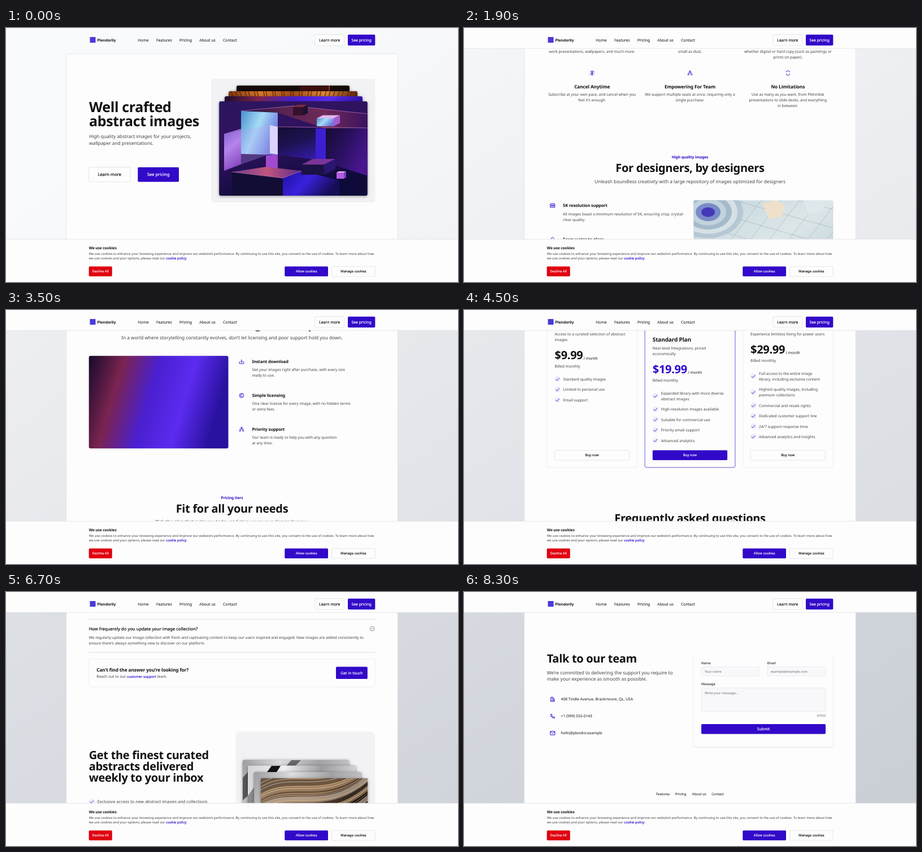
These frames come from a looping animation (800x450 px, 8400 ms). An HTML page:

```html
<!DOCTYPE html>
<html lang="en">
<head>
<meta charset="utf-8">
<title>Landing page scroll</title>
<style>
html, body { margin: 0; width: 100%; height: 100%; overflow: hidden; background: #f9fafb; }
svg { display: block; width: 100vw; height: 100vh; }
text { font-family: "Noto Sans", sans-serif; white-space: pre; text-rendering: geometricPrecision; }
text[font-weight="600"] { letter-spacing: -.0155em; }
text[font-weight="500"] { letter-spacing: .012em; }
.inter { font-family: Inter, sans-serif; }
.serif { font-family: "Noto Serif", serif; }
.lift { filter: drop-shadow(0 .5px .6px rgba(0, 0, 0, .14)); }
.panel { filter: drop-shadow(0 1px .8px rgba(0, 0, 0, .12)); }
.photo { filter: drop-shadow(0 1px 2.5px rgba(0, 0, 0, .45)); }
</style>
</head>
<body>
<svg id="stage" viewBox="0 0 800 450"></svg>
<script>
const INK = '#111', BODY = '#404040', BRAND = '#3209c9', PAPER = '#fdfdfd', LINE = '#e3e4e8';
const XS = 5.83, SM = 6.67, MD = 7.5, LG = 8.33, H2 = 20;

// A hairline outline gives the medium weight between regular and bold
const medium = (size, color) => `stroke="${color}" stroke-width="${(size * .028).toFixed(3)}"`;
const text = (x, y, s, size = SM, weight = 400, fill = BODY, anchor = 'start', cls = '') =>
  `<text class="${cls}" x="${x}" y="${(y + size * .36).toFixed(2)}" font-size="${size}" font-weight="${weight}" fill="${fill}" text-anchor="${anchor}" ${weight === 500 ? medium(size, fill) : ''}>${s}</text>`;
const link = (s, size) => `<tspan font-size="${size}" fill="${BRAND}" letter-spacing=".07" ${medium(size, BRAND)}>${s}</tspan>`;
const mid = (x, y, s, size, weight, fill) => text(x, y, s, size, weight, fill, 'middle');
const lines = (x, y, step, list, ...style) => list.map((s, i) => text(x, y + i * step, s, ...style)).join('');
const rect = (x, y, x2, y2, fill, r = 0, extra = '') =>
  `<rect x="${x}" y="${y}" width="${x2 - x}" height="${y2 - y}" rx="${r}" fill="${fill}" ${extra}/>`;
const border = (color, w = .6) => `stroke="${color}" stroke-width="${w}"`;
const poly = (points, fill, extra = '') => `<polygon points="${points}" fill="${fill}" ${extra}/>`;
const stroke = (d, color, w, extra = '') => `<path d="${d}" fill="none" stroke="${color}" stroke-width="${w}" ${extra}/>`;
const group = (y, body) => `<g transform="translate(0 ${y})">${body}</g>`;
const clipTo = (id, box, body) => `<clipPath id="${id}">${box}</clipPath><g clip-path="url(#${id})">${body}</g>`;
const ring = r => `M${-r} 0a${r} ${r} 0 1 0 ${2 * r} 0a${r} ${r} 0 1 0 ${-2 * r} 0`;
const grad = (id, dir, ...colors) => {
  const [x1, y1, x2, y2] = dir;
  return `<linearGradient id="${id}" x1="${x1}" y1="${y1}" x2="${x2}" y2="${y2}">` +
    colors.map((c, i) => `<stop offset="${i / (colors.length - 1)}" stop-color="${c}"/>`).join('') + '</linearGradient>';
};

function button(x, y, x2, y2, label, size, kind = 'main') {
  const fill = { main: BRAND, plain: PAPER, red: '#e00010' }[kind];
  const edge = kind === 'plain' ? border('#dcdce0', .5) : '';
  return rect(x, y, x2, y2, fill, 1.7, edge + ' class="lift"') +
    mid((x + x2) / 2, (y + y2) / 2, label, size, 500, kind === 'plain' ? INK : '#fff');
}
const icon = (x, y, d) => `<g transform="translate(${x} ${y})"><circle r="10" fill="#fff" class="lift"/>${stroke(d, BRAND, 1)}</g>`;
const check = (x, y) => `<g transform="translate(${x} ${y})"><circle r="5" fill="#ecebfb"/>${stroke('M-3.2 .2L-1 2.4L3.4-2.2', BRAND, .9)}</g>`;
const heading = (y, title, sub) => mid(400, y, title, H2, 600, INK) + (sub ? mid(400, y + 24, sub, LG) : '');

const ICONS = {
  save: 'M-3.8 0V3.6H3.8V0M0-3.8V1.2M-2.2-1L0 1.2L2.2-1',
  craft: 'M-2.6-1.2L.6-3L3.4-2.6L3 .6L.8 2.8L-1.6 2.6L-3 .8ZM-3.8 3.6L-1.6 2.6M2.4-2.4L4-3.8',
  copy: ring(3.8) + 'M1.5-1A1.8 1.8 0 1 0 1.5 1',
  cancel: 'M-3.4-1.6A3.8 3.8 0 0 1 3.7-.8M3.4 1.6A3.8 3.8 0 0 1-3.7 .8M1.3-1.3H-1V0H1V1.4H-1.4M0-2.2V2.3',
  team: 'M-1.3-2.6a1.3 1.3 0 1 0 2.6 0a1.3 1.3 0 1 0-2.6 0M-1.8 4V1A1.8 1.8 0 0 1 1.8 1V4M-3-1.4V-.4M3-1.4V-.4M-3.8 4V2L-2.6 .6M3.8 4V2L2.6 .6',
  loop: 'M-3.6-1.4A3.8 3.8 0 0 1 2.7-2.7V-1M3.6 1.4A3.8 3.8 0 0 1-2.7 2.7V1',
  hd: 'M-4-3.2H4V3.2H-4ZM-2.2-1.4V1.4M-2.2 0H-.6M-.6-1.4V1.4M1-1.2H2.2V1.2H1Z',
  drop: 'M0-4.2L2.7-1.4A3.7 3.7 0 1 1-2.7-1.4ZM-2.4-.8L2.4 3M2.2-.6L-2.2 3',
  arc: 'M-4 2.6V.8A4 4 0 0 1 4 .8V2.6M-2.5 2.6V.8A2.5 2.5 0 0 1 2.5 .8V2.6M-1 2.6V.8A1 1 0 0 1 1 .8V2.6',
  office: 'M-4.2 3.6H4.2M-3.2 3.6V-3.6H1V3.6M1-.6H3.2V3.6M-1.8-1.8H-.4M-1.8 0H-.4M-1.8 1.8H-.4',
  phone: 'M-3.6-3.4H-1.4L-.6-1.2L-1.8-.4A5 5 0 0 0 .6 1.8L1.4 .6L3.6 1.4V3.6A7 7 0 0 1-3.6-3.4Z',
  mail: 'M-4-3.2H4V3.2H-4ZM-4-2.6L0 .6L4-2.6',
};

const item = (x, y, name, title, a, b) =>
  icon(x + 10, y, ICONS[name]) + text(x + 28.4, y, title, MD, 600, INK) + lines(x + 28.4, y + 14.5, 10, [a, b]);

// Front, top and right faces of a block
const block = (x, y, w, h, d, front, top, side) =>
  poly(`${x},${y} ${x + w},${y} ${x + w},${y + h} ${x},${y + h}`, front) +
  poly(`${x},${y} ${x + d},${y - d / 2} ${x + w + d},${y - d / 2} ${x + w},${y}`, top) +
  poly(`${x + w},${y} ${x + w + d},${y - d / 2} ${x + w + d},${y + h - d / 2} ${x + w},${y + h}`, side);

function cubes() {
  const shapes = [
    ['416,147 508,138 640,152 640,180 565,178 481,150', 'url(#dusk)'],
    ['386,188 416,179 416,241 386,253', 'url(#plum)'],
    ['416,147 481,150 481,225 416,223', 'url(#ice)'],
    ['386,188 470,171 470,222 386,253', '#b6a0f4', 'opacity=".28"'],
    ['481,175 565,178 565,236 481,224', 'url(#deep)'],
    ['566,178 640,177 640,262 566,238', 'url(#wing)'],
    ['548,178 566,178 566,237 548,233', '#3c1fd0'],
    ['467,172 481,175 481,224 467,222', '#dcd4fb'],
    ['460,226 481,224 481,250 460,247', '#a04ad0'],
    ['400,255 460,246 523,253 490,266', 'url(#rose)'],
    ['400,255 490,266 490,297 400,297', '#120d34'],
    ['490,266 523,253 590,270 590,297 490,297', 'url(#glow)'],
  ];
  return clipTo('heroClip', rect(377.5, 130, 639.5, 297, '#000', 3),
    rect(377, 130, 640, 298, 'url(#night)') + shapes.map(s => poly(...s)).join('') +
    stroke('M386 188L416 179M416 147L508 138L640 152M481 175L640 177M400 255L490 266L523 253', '#d98ac8', .6) +
    block(508, 140, 18, 15, 8, '#33122e', '#7a2c3c', '#1d1030') +
    block(550, 160, 30, 14, 11, 'url(#ice)', '#e0b8ee', '#a85ad0') +
    block(523, 242, 40, 18, 20, '#1c1144', '#7a3596', '#2a1670') +
    block(585, 256, 13, 11, 4, '#b65ce0', '#efc4f0', '#7a3cc8'));
}

function glass() {
  let s = rect(406, 92, 654, 256, 'url(#mist)');
  for (let i = 0; i < 12; i++) {
    s += stroke(`M${390 + i * 34} 92l-130 170M400 ${40 + i * 30}l260 ${70 + i * 3}`, '#8ba0ad', .5);
  }
  for (let i = 0; i < 6; i++) {
    s += `<ellipse cx="432" cy="113" rx="${62 - i * 10}" ry="${46 - i * 7.5}" fill="${['#b3c5d2', '#dce6ea', '#9db4c7', '#c8d8e0', '#6d7fc6', '#3c2ab6'][i]}" opacity=".85"/>`;
  }
  const tube = (x, y, w, fill) => stroke(`M${x} ${y}L${x - 100} ${y + 96}`, fill, w, 'stroke-linecap="round"');
  s += tube(506, 186, 24, '#eef0fb') + tube(506, 186, 15, '#6a52d4') + tube(503, 187, 6, '#e9e8ff') +
    tube(529, 198, 18, '#dfe3f4') + tube(529, 198, 9, '#4b2fcb') + tube(533, 201, 3, '#fff');
  s += poly('520,170 543,164 541,206 518,204', '#e4c7ce', 'opacity=".75"') + poly('540,172 560,180 545,200', '#d895b1', 'opacity=".7"');
  s += poly('566,174 588,160 614,170 612,204 588,217 568,200', '#b9dbe9') +
    poly('566,174 590,184 588,217 568,200', '#8fbace') + stroke('M566 174L590 184L614 170M590 184L588 217', '#f3fafc', 1);
  s += poly('528,98 552,92 568,100 562,122 540,124', '#efe0cb') + poly('600,92 640,92 636,112 610,116', '#dde9ec');
  for (let i = 0; i < 4; i++) {
    s += `<ellipse cx="590" cy="262" rx="${70 - i * 12}" ry="${37 - i * 7}" fill="${['#93aab8', '#d5e2e6', '#8494c4', '#b9cbd8'][i]}" opacity=".9"/>`;
  }
  return clipTo('glassClip', rect(406.5, 92, 653.5, 256, '#000', 3), s);
}

function strands() {
  const wave = y => `M445 ${y}C505 ${y - 44} 565 ${y + 16} 650 ${y - 64}`;
  let s = rect(451, 119, 640, 240, 'url(#umber)');
  for (let i = 0; i < 7; i++) s += stroke(wave(156 + i * 18), i % 2 ? '#f3e2cb' : '#c9a47a', 9 - i * .6, 'opacity=".5"');
  for (let i = 0; i < 34; i++) s += stroke(wave(132 + i * 4.2 + 3 * Math.sin(i * 2)), i % 3 ? '#e3bd8a' : '#fff8ee', .7, 'opacity=".75"');
  return clipTo('strandClip', rect(451, 119, 640, 240, '#000', 3), s);
}

function stripes() {
  let d = '';
  for (let i = 0; i < 28; i++) d += `M${398 + i * 8 + 2 * Math.sin(i * 3)} 112l${4 - i * .3} 10`;
  return stroke(d, '#5a1f0c', 1.6, 'opacity=".75"');
}

const hero = () =>
  lines(147, 139.5, 25, ['Well crafted', 'abstract images'], 25, 600, INK) +
  lines(147, 192.3, 11.7, ['High quality abstract images for your projects,', 'wallpaper and presentations.'], LG) +
  button(146.7, 246.7, 220, 272.4, 'Learn more', MD, 'plain') + button(233.3, 246.7, 306, 272.4, 'See pricing', MD) +
  rect(363.3, 90, 653.5, 309, '#f2f2f4', 4) +
  rect(408, 102, 608, 150, '#16090a', 3, 'class="photo"') + rect(520, 103, 570, 112, '#3d0f0c') + rect(571, 102, 573, 112, '#a33a20') +
  rect(394, 112, 622, 160, 'url(#ember)', 3, 'class="photo"') + stripes() +
  rect(387, 121, 631, 170, 'url(#violet)', 3, 'class="photo"') +
  rect(377.5, 130, 639.5, 297, '#120a35', 3, 'class="photo"') + cubes();

const features = () => {
  const rows = [
    [239, 'save', 'Infinite Download', 'Once you subscribe to our plans, they’re all yours.', 'Download as many as you want and use them for', 'work presentations, wallpapers, and much more.'],
    [239, 'craft', 'Purely Handcrafted', 'No AI, no generic images. Crafted from various', 'chemicals, fabrics, clouds, or even particles as', 'small as dust.'],
    [239, 'copy', 'All Are Under Licensed', 'The only limitation with these abstract images is', 'that you are not able to sell them in any form,', 'whether digital or hard copy (such as paintings or', 'prints on paper).'],
    [335.5, 'cancel', 'Cancel Anytime', 'Subscribe at your own pace, and cancel when you', 'feel it’s enough.'],
    [335.5, 'team', 'Empowering For Team', 'We support multiple seats at once, requiring only a', 'single purchase.'],
    [335.5, 'loop', 'No Limitations', 'Use as many as you want, from Plimmble', 'presentations to slide decks, and everything', 'in between.'],
  ];
  return mid(400, 152, 'Premium abstract images', SM, 600, BRAND) +
    heading(172, 'Easy access to top quality images', 'In a world where storytelling constantly evolves, we lead with groundbreaking images designed for your presentation excellence.') +
    rows.map(([y, name, title, ...copy], i) => {
      const x = 226.7 + (i % 3) * 173.3;
      return icon(x, y, ICONS[name]) + mid(x, y + 24, title, LG, 600, INK) + lines(x, y + 38.3, 10, copy, SM, 400, BODY, 'middle');
    }).join('');
};

const logos = [
  ['Ferrinmoor', 9.2, 600, 'inter', 'circle'], ['QUIVLO', 10.5, 900, 'inter', 'square'], ['VORSTEL', 10, 600, 'serif', 'circle'],
  ['Zim Lop', 9.5, 700, 'inter', 'square'], ['PLOND BRUF', 11, 800, 'inter', ''], ['Wexolin', 10.5, 900, 'inter', 'square'],
];
const logoRow = () => {
  let s = '';
  for (let i = -1; i < 8; i++) {
    const [name, size, weight, cls, mark] = logos[(i + 6) % 6], x = 140 + i * 104.2;
    if (mark === 'circle') s += `<circle cx="${x + 8}" cy="47" r="7.7" fill="#262626"/>`;
    if (mark === 'square') s += rect(x + 1, 40, x + 15, 54, '#262626', 1);
    s += text(x + (mark ? 20 : -1), 47.3, name, size, weight, '#262626', 'start', cls);
  }
  return clipTo('logoClip', rect(107, 30, 693, 64, '#000'), `<g id="logos">${s}</g>`);
};

const designers = () =>
  mid(400, 15, 'High quality images', SM, 600, BRAND) +
  heading(35, 'For designers, by designers', 'Unleash boundless creativity with a large repository of images optimized for designers') +
  item(146.7, 101.5, 'hd', '5K resolution support', 'All images boast a minimum resolution of 5K, ensuring crisp, crystal-', 'clear quality.') +
  item(146.7, 161.5, 'drop', 'From water to glass', 'We offer a wide array of abstractions, ranging from water to glass,', 'and encompassing various styles including 3D and vector.') +
  item(146.7, 221.5, 'arc', 'Portrait or landscape', 'Effortlessly adapt your images for any platform - whether it’s a', 'stunning wallpaper or captivating Vorlipeek reels and stories.') +
  glass() +
  heading(351, 'Convenience and licensing that empowers', 'In a world where storytelling constantly evolves, don’t let licensing and poor support hold you down.') +
  rect(146.7, 407, 393.5, 571, 'url(#violet)', 3) +
  item(407, 417, 'save', 'Instant download', 'Get your images right after purchase, with every size', 'ready to use.') +
  item(407, 477, 'copy', 'Simple licensing', 'One clear license for every image, with no hidden terms', 'or extra fees.') +
  item(407, 537, 'team', 'Priority support', 'Our team is ready to help you with any question', 'at any time.');

function plan(x, y, title, copy, price, items, main) {
  const x0 = x + 13.7, dy = copy.length * 10;
  let s = rect(x, 7, x + 159.8, 279, PAPER, 3, main ? border('#5a48d2', .9) : border(LINE)) +
    text(x0, y, title, 10, 600, INK) + lines(x0, y + 15.8, 10, copy) +
    text(x0, y + 33 + dy, price, H2, 600, main ? BRAND : INK) +
    text(x0 + (price.length < 6 ? 51 : 62.5), y + 38.3 + dy, '/ month', SM, 400, INK) +
    text(x0, y + 52.5 + dy, 'Billed monthly');
  let row = y + 75.5 + dy;
  for (const entry of items) {
    const parts = entry.split('|');
    s += check(x0 + 5, row + (parts.length - 1) * 5) + lines(x0 + 15, row, 10, parts);
    row += 8.4 + parts.length * 10;
  }
  return s + button(x0, 248.5, x + 146, 266, 'Buy now', XS, main ? 'main' : 'plain');
}
const pricing = () =>
  mid(400, -105, 'Pricing tiers', SM, 600, BRAND) +
  heading(-86, 'Fit for all your needs', 'Pick the plan that suits you today and step up as your demands grow.') +
  mid(370, -22, 'Monthly', SM, 500, BRAND) + mid(430, -22, 'Annually', SM, 500, BODY) +
  plan(146.8, 27, 'Basic Plan', ['Access to a curated selection of abstract', 'images'], '$9.99',
    ['Standard quality images', 'Limited to personal use', 'Email support']) +
  plan(320.1, 52, 'Standard Plan', ['Next-level Integrations, priced', 'economically'], '$19.99',
    ['Expanded library with more diverse|abstract images', 'High-resolution images available', 'Suitable for commercial use', 'Priority email support', 'Advanced analytics'], true) +
  text(333.8, 28, 'Most Popular', XS, 500, BRAND) +
  plan(493.4, 27, 'Premium Plan', ['Experience limitless living for power users'], '$29.99',
    ['Full access to the entire image|library, including exclusive content', 'Highest quality images, including|premium collections', 'Commercial and resale rights', 'Dedicated customer support line', '24/7 support response time', 'Advanced analytics and insights']);

const faq = () => {
  const list = [
    ['What types of images are available on your platform?', 'Our platform offers a diverse range of abstract images across many styles and themes. Explore everything from vivid', 'renders to calm textures.'],
    ['How can I access and download images from your platform?', 'Accessing and downloading images from our platform is simple. Upon signing up and logging in, users can browse through our curated collection and', 'download their chosen images directly to their devices with just a few clicks.'],
    ['Do you offer free images, or is there a subscription required?', 'We provide both free and premium images on our platform. Users can explore a selection of free images without any subscription. For access to our entire', 'library and additional features, we offer subscription plans tailored to different user needs.'],
    ['What payment methods do you accept for subscriptions?', 'We accept a variety of payment methods, including credit/debit cards and online payment gateways, to make the subscription process convenient for our', 'users.'],
    ['Can I cancel or modify my subscription at any time?', 'Yes, absolutely. You have the flexibility to cancel or modify your subscription at any time through your account settings. Changes will take effect', 'immediately, ensuring you have full control over your subscription preferences.'],
    ['How frequently do you update your image collection?', 'We regularly update our image collection with fresh and captivating content to keep our users inspired and engaged. New images are added consistently to', 'ensure there’s always something new to discover on our platform.'],
  ];
  return heading(-81, 'Frequently asked questions', 'Get all the answers you need about our platform and plans.') +
    list.map(([q, a, b], i) => {
      const y = -18 + i * 58.7;
      return text(146.7, y, q, MD, 500, INK) + lines(146.7, y + 14.6, 10, [a, b]) +
        stroke(`M146.7 ${y + 41.3}H653.3`, '#d6d7da', .8) +
        `<g transform="translate(648.3 ${y - .4})">${stroke(ring(3.9) + 'M-2 0H2', '#777', .8)}</g>`;
    }).join('') +
    rect(146.8, 329, 653.2, 378, PAPER, 3, border(LINE)) +
    text(160.3, 348.3, 'Can’t find the answer you’re looking for?', LG, 600, INK) +
    text(160.3, 359.2, `Reach out to our ${link('customer support', 6)} team.`) +
    button(584, 342.5, 639.8, 364, 'Get in touch', SM);
};

const newsletter = () =>
  lines(146.7, 78, 20, ['Get the finest curated', 'abstracts delivered', 'weekly to your inbox'], H2, 600, INK) +
  ['Exclusive access to new abstract images and collections', 'Unlock special promotions only for subscribers', 'Regular doses of artistic inspiration']
    .map((s, i) => check(151.8, 160.5 + i * 20) + text(161.7, 160.5 + i * 20, s, MD)).join('') +
  rect(146.9, 227, 284, 243.3, '#f8f8fb', 1.7, border(LINE)) + text(153, 235, 'Enter your email', XS, 400, '#6b6b70') +
  button(291, 227, 329.5, 243.3, 'Subscribe', XS) +
  text(146.7, 255, 'We only send you the best! No spam.') +
  rect(406.6, 36.5, 653.4, 292, '#f2f2f5', 8) +
  rect(419, 86.5, 607, 209, 'url(#silver)', 3, 'class="photo"') +
  poly('419,118 428,108 428,150 419,158', '#55565a') + poly('419,180 428,165 428,200 419,204', '#4a4a4e') +
  poly('505,87 522,87 512,97 496,97', '#66676b') +
  rect(428, 96.5, 619, 218, 'url(#steel)', 3, 'class="photo"') +
  poly('470,97 486,97 479,108 462,108', '#141414') + poly('428,150 439,135 439,190 428,200', '#8a8b8f') +
  rect(439, 108, 629, 229, 'url(#silver)', 3, 'class="photo"') +
  rect(451, 119, 640, 240, '#2a211e', 3, 'class="photo"') + strands();

const field = (x, y, x2, y2, label, hint) =>
  text(x, y - 7, label, XS, 500, BODY) + rect(x, y, x2, y2, '#f8f8fb', 1.7, border(LINE)) + text(x + 6, y + 8.8, hint, XS, 400, '#6b6b70');
const contact = () =>
  text(146.7, 118, 'Talk to our team', H2, 600, INK) +
  lines(146.7, 142.5, 11.8, ['We’re committed to delivering the support you require to', 'make your experience as smooth as possible.'], LG) +
  [['office', '408 Tindle Avenue, Brackmoore, QL, USA'], ['phone', '+1 (999) 555-0143'], ['mail', 'hello@plendor.example']]
    .map(([name, s], i) => icon(156.8, 190 + i * 30, ICONS[name]) + text(171.6, 190 + i * 30, s, SM, 400, INK)).join('') +
  rect(406.6, 108, 653.4, 274, PAPER, 3, 'class="panel"') +
  field(420, 132.5, 523.3, 149, 'Name', 'Your name') + field(536.7, 132.5, 640, 149, 'Email', 'example@example.com') +
  field(420, 170, 640, 212.3, 'Message', 'Write your message...') +
  text(640, 219, '0/500', XS, 400, '#6b6b70', 'end') + button(420, 234, 640, 251.5, 'Submit', SM) +
  [[340, 'Features'], [374, 'Pricing'], [403.6, 'About us'], [438.2, 'Contact']].map(([x, s]) => text(x, 358, s, XS, 500, BODY)).join('');

const header = () =>
  `<g id="bar">${rect(0, 0, 800, 36, PAPER, 0, 'class="lift"')}${stroke('M0 36.2H800', '#dfe0e4', .7)}</g>` +
  rect(148.5, 16, 158.5, 26, '#4a3ad8') + text(161.4, 21.3, 'Plendorily', 6.7, 700, INK, 'start', 'inter') +
  [[233.3, 'Home'], [266, 'Features'], [307, 'Pricing'], [342.3, 'About us'], [384, 'Contact']].map(([x, s]) => text(x, 21.3, s, SM, 500, BODY)).join('') +
  button(547, 11.7, 598.7, 30.9, 'Learn more', SM, 'plain') + button(605, 11.7, 653.3, 30.9, 'See pricing', SM);

const banner = () =>
  rect(0, 374, 800, 450, PAPER) + stroke('M0 374.2H800', '#dedfe3', .8) +
  text(146.7, 389.3, 'We use cookies', SM, 600, INK) +
  text(146.7, 399.6, 'We use cookies to enhance your browsing experience and improve our website’s performance. By continuing to use this site, you consent to the use of cookies. To learn more about how', XS) +
  text(146.7, 407.9, `we use cookies and your options, please read our ${link('cookie policy', XS)}.`, XS) +
  button(146.7, 422.5, 187.7, 440, 'Decline All', XS, 'red') +
  button(493.3, 422.5, 570, 440, 'Allow cookies', XS) + button(576.7, 422.5, 653.3, 440, 'Manage cookies', XS, 'plain');

// Scroll offsets (px) reached at these 100 ms steps
const STEPS = [0, 9, 27, 45, 59, 75, 83];
const STOPS = [0, 356, 825, 1588, 2038, 2459, 2721.5];
const [, LOGOS, SPLIT, PLANS, FAQ, NEWS, TALK] = STOPS;
const PAGE = TALK + 450;

const defs = `<linearGradient id="page" gradientUnits="userSpaceOnUse" x1="-434" y1="278" x2="1234" y2="2896">
  <stop offset=".089" stop-color="#f9fafb"/><stop offset="1" stop-color="#c9cdd5"/></linearGradient>` +
  grad('dusk', [0, 0, 1, 0], '#1d1240', '#5a2350', '#6e2a58', '#3a1260') +
  grad('night', [0, 0, .4, 1], '#2c1560', '#30125e', '#0d0a3a') +
  grad('ice', [0, 0, 1, .5], '#4a8fd0', '#a4dcf6', '#6a78dc') +
  grad('plum', [0, 0, .3, 1], '#6a46c0', '#b47ae8', '#7a2cae') +
  grad('deep', [0, 0, .5, 1], '#140d34', '#1d1250', '#321aa0') +
  grad('wing', [0, 0, 1, .6], '#150b33', '#2a1060', '#4a1690') +
  grad('rose', [0, 0, 1, 0], '#6a3a8c', '#c0557e', '#5a2c88') +
  grad('glow', [0, 0, 1, .4], '#1c12a0', '#3a20dc', '#160e58') +
  grad('ember', [0, 0, 1, 0], '#7d3510', '#d8792a', '#a04a18', '#e08a3a', '#5e260e') +
  grad('violet', [0, 0, 1, .2], '#160a2c', '#7b2450', '#4a1fd0', '#5c2bf0', '#2a12a0') +
  grad('mist', [0, 0, 1, 1], '#c3d4dc', '#dce6e8', '#b9cdd8') +
  grad('umber', [0, .2, .8, 1], '#6a5644', '#6e553e', '#1a1312', '#0e0a0a') +
  grad('silver', [0, 0, 1, .3], '#9d9d9f', '#dcdcde', '#a2a2a5', '#c9c9cc') +
  grad('steel', [0, 0, 1, .2], '#d3d4d6', '#f0f0f2', '#9c9da0', '#d6d6d8');

const stage = document.getElementById('stage');
stage.innerHTML = `<defs>${defs}</defs><g id="doc">` +
  rect(0, 0, 800, PAGE, 'url(#page)') + rect(106.7, 46, 693.3, PAGE + 10, PAPER, 1.5, border('#d9dbe0')) +
  hero() + group(LOGOS, logoRow() + features()) + group(SPLIT, designers()) + group(PLANS, pricing()) +
  group(FAQ, faq()) + group(NEWS, newsletter()) + group(TALK, contact()) +
  `</g>${header()}${banner()}`;
const [doc, bar, logoStrip] = ['doc', 'bar', 'logos'].map(id => document.getElementById(id));

// Monotone cubic through the stops
const slopes = STEPS.slice(1).map((s, i) => (STOPS[i + 1] - STOPS[i]) / (s - STEPS[i]));
const tangents = STEPS.map((_, i) => {
  const a = slopes[i - 1] ?? slopes[i], b = slopes[i] ?? a;
  return 2 * a * b / (a + b);
});
function scrollAt(step) {
  let i = 0;
  while (i < slopes.length - 1 && step >= STEPS[i + 1]) i++;
  const h = STEPS[i + 1] - STEPS[i], u = (step - STEPS[i]) / h, v = 1 - u;
  return STOPS[i] * v * v * (1 + 2 * u) + STOPS[i + 1] * u * u * (3 - 2 * u) +
    h * u * v * (tangents[i] * v - tangents[i + 1] * u);
}

function draw(ms) {
  const step = Math.floor(ms % 8400 / 100), y = scrollAt(step);
  doc.setAttribute('transform', `translate(0 ${(-y).toFixed(2)})`);
  logoStrip.setAttribute('transform', `translate(${(9 - step) * 2 % 625} 0)`);
  bar.setAttribute('visibility', y > 0 ? 'visible' : 'hidden');
}

const start = performance.now();
(function tick() {
  draw(performance.now() - start);
  requestAnimationFrame(tick);
})();
</script>
</body>
</html>
```
